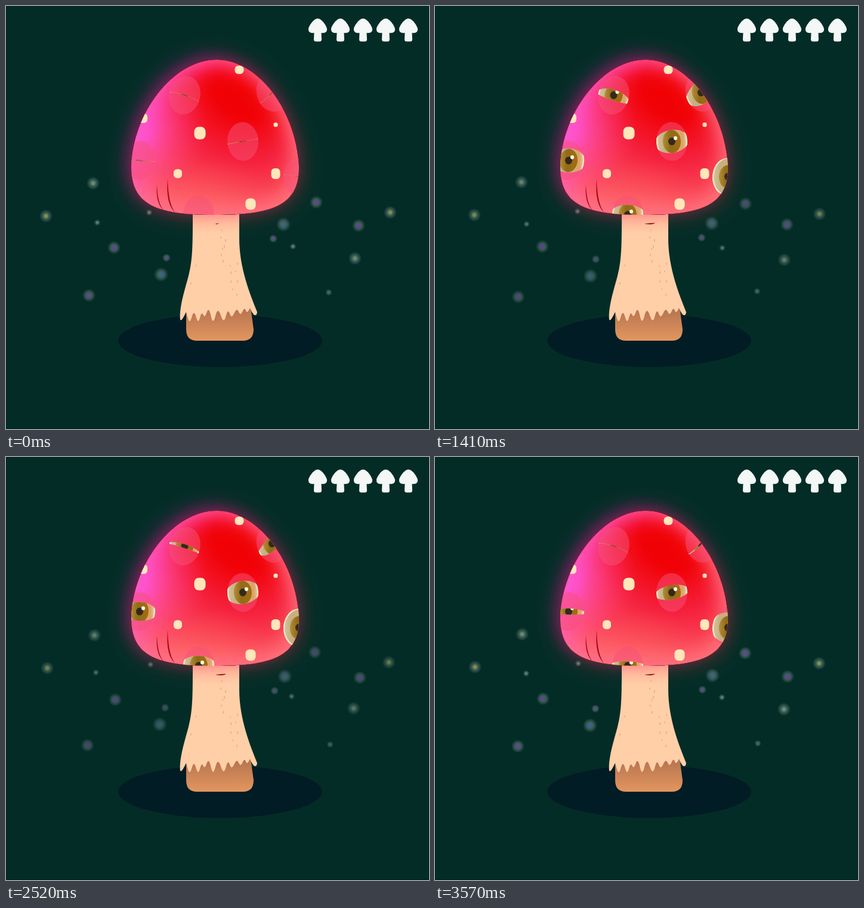
An HTML page with a canvas for the animation above (3600 ms loop, 709 px wide and 709 px high).

```html
<!DOCTYPE html>
<html>
<head>
<meta charset="utf-8">
<style>
html, body { margin: 0; height: 100%; overflow: hidden; background: #042c26; }
canvas { display: block; }
</style>
</head>
<body>
<canvas width="709" height="709"></canvas>
<script>
const canvas = document.querySelector('canvas');
const ctx = canvas.getContext('2d');
const LOOP = 3600, BLINK = 1200, TAU = Math.PI * 2;
const rad = deg => deg * Math.PI / 180;

const cap = new Path2D('M353 90C425 90 488 180 491 270C491 335 446 350 350 350C255 350 210 335 210 270C212 180 280 90 353 90Z');
const aroundCap = new Path2D('M-99 -99H808V808H-99Z');
aroundCap.addPath(cap);
const scratches = new Path2D('M253 299Q250 332 266 344Q254 334 253 299ZM271 289Q267 334 285 347Q272 336 271 289Z');
const base = new Path2D('M302 505L410 505L415 542Q415 561 397 561H320Q302 561 302 542Z');
const icon = new Path2D('M0 21C7 21 15 34 15.5 38C16 43 13 46 6 45L6.5 56Q6.5 59.5 3 59.5H-3Q-6.5 59.5 -6.5 56L-6 45C-13 46 -16 43 -15.5 38C-15 34 -7 21 0 21Z');

// Control points of the drips along the lower hem of the stem, right to left
const hem = [[409,506], [404,517], [400,504], [393,520], [387,505], [378,525], [372,506], [365,534],
  [355,503], [347,536], [340,503], [333,524], [328,511], [322,534], [315,508], [308,534], [302,513]];
const stem = new Path2D('M313 345H391V390C391 440 410 485 421 513Q420 521 415 517Q411 512 409 506');
hem.slice(1, -1).forEach(([x, y], i) => {
  const [nx, ny] = hem[i + 2];
  stem.quadraticCurveTo(x, y, (x + nx) / 2, (y + ny) / 2);
});
stem.lineTo(302, 513);
stem.bezierCurveTo(297, 522, 295, 528, 292, 526);
stem.bezierCurveTo(290, 505, 300, 475, 306, 452);
stem.bezierCurveTo(313, 425, 313, 400, 313, 345);

const specks = [[362,376], [360,388], [368,393], [363,407], [361,417], [364,428], [376,436], [388,432],
  [377,447], [385,445], [377,462], [388,462], [380,475], [387,484], [366,403], [318,435], [310,465]];
const dots = [[391,107,7.5,7], [230,188,7,8], [325,213,9.5,10.5], [288,281,7,7.5],
  [452,199,3.5,3.5], [452,281,7.5,9], [410,332,8.5,9.5]];

// Blink: opening = mid + swing * cos(phase - peak), limited to [0, max]
const eyes = [
  { x: 299.5, y: 149.5, spin: 13, tilt: 18, sag: 5, mid: .5, swing: .5, peak: 600, max: 1 },
  { x: 446, y: 145, spin: -14, tilt: -48, sag: -5, mid: .48, swing: .5, peak: 480, max: 1 },
  { x: 397, y: 227, spin: -3, tilt: -10, sag: 0, mid: .66, swing: .77, peak: 345, max: .6 },
  { x: 224, y: 259, spin: 6, tilt: 2, sag: 2, mid: .45, swing: .45, peak: 405, max: .63 },
  { x: 323, y: 350, spin: 0, tilt: 2, sag: -1, mid: .46, swing: .6, peak: 345, max: .52 },
  { x: 491, y: 286, spin: 4, tilt: 9, sag: 1, mid: .47, swing: .53, peak: 145, max: 1 }
];

const tints = { green: '175,215,160', yellow: '225,222,95', purple: '178,85,235', blue: '90,150,210' };
const times = [0, 600, 1050, 1770, 2520, 3120];
const swarms = [
  { dx: [0, -2.6, -3, .9, 2.2, 1.4], dy: [0, -.9, -1.6, -1.5, 1.8, .7], glow: [.6, .6, .57, .55, .52, .38],
    flies: [[146,297,11,'green'], [67,352,11,'yellow'], [181,405,11,'purple'], [465,366,12,'blue'],
      [448,390,7,'purple'], [591,368,11,'purple'], [240,346,5.5,'green'], [541,480,5.5,'blue']] },
  { dx: [0, 2.3, 1.6, -.6, -2.3, -2], dy: [0, 2.3, 1.7, 2.8, -1.8, -3.1], glow: [.6, .68, .5, .55, .47, 1],
    flies: [[520,329,11,'purple'], [644,346,11,'yellow'], [585,423,11,'green'], [139,485,11,'purple'],
      [260,450,12,'blue'], [269,422,7,'purple'], [153,363,5.5,'green'], [481,403,5.5,'green']] }
];

// Smooth closed curve through the values at `times`
function cycle(values, t) {
  const n = times.length;
  const at = i => times[(i + n) % n] + Math.floor(i / n) * LOOP;
  const value = i => values[(i + n) % n];
  const slope = i => (value(i + 1) - value(i - 1)) / (at(i + 1) - at(i - 1));
  let i = n - 1;
  while (times[i] > t) i--;
  const span = at(i + 1) - at(i), u = (t - at(i)) / span, v = 1 - u;
  return v * v * ((1 + 2 * u) * value(i) + u * span * slope(i)) +
    u * u * ((3 - 2 * u) * value(i + 1) - v * span * slope(i + 1));
}

function addStops(gradient, stops) {
  stops.forEach(([offset, color]) => gradient.addColorStop(offset, color));
  return gradient;
}
const linear = (x0, y0, x1, y1, ...stops) => addStops(ctx.createLinearGradient(x0, y0, x1, y1), stops);
const radial = (x, y, r, ...stops) => addStops(ctx.createRadialGradient(x, y, 0, x, y, r), stops);

function fill(color, path, rule = 'nonzero') {
  ctx.fillStyle = color;
  ctx.fill(path, rule);
}
function oval(x, y, rx, ry, color, angle = 0) {
  const path = new Path2D();
  path.ellipse(x, y, rx, ry, rad(angle), 0, TAU);
  if (color) fill(color, path);
  return path;
}
function setShadow(color, blur, x, y) {
  ctx.shadowColor = color;
  ctx.shadowBlur = blur;
  ctx.shadowOffsetX = x;
  ctx.shadowOffsetY = y;
}

function drawFlies(t) {
  for (const { dx, dy, glow, flies } of swarms) {
    ctx.globalAlpha = Math.min(1, cycle(glow, t));
    for (const [x, y, r, tint] of flies) {
      const px = x + cycle(dx, t), py = y + cycle(dy, t), rgb = tints[tint];
      oval(px, py, r, r, radial(px, py, r, [0, `rgba(${rgb},1)`], [.25, `rgba(${rgb},.88)`],
        [.45, 'rgba(175,190,190,.55)'], [.75, 'rgba(175,190,190,.27)'], [1, 'rgba(175,190,190,0)']));
    }
  }
  ctx.globalAlpha = 1;
}

function drawStem(wake) {
  oval(359, 561, 171, 44, '#011c25');
  fill(linear(0, 510, 0, 560, [0, '#b87550'], [1, '#e2965f']), base);
  fill(linear(0, 350, 0, 385, [0, '#ffc4a2'], [1, '#ffcfa8']), stem);
  specks.forEach(([x, y], i) => oval(x, y, 1, 1.4 + i % 3 * .5, 'rgba(205,145,110,.5)'));
  const end = 357 + 12 * wake;
  fill('#8c1111', new Path2D(`M351 365Q355 364 ${end} 363.5Q${end - 4} 367.5 351 365Z`));
}

function drawEye({ x, y, spin, tilt, sag, mid, swing, peak, max }, t, wake) {
  const open = mid + swing * Math.cos((t - peak) / BLINK * TAU);
  const h = Math.max(.3, 32 * wake * Math.min(max, Math.max(0, open)));
  const top = (-h - sag / 4) / .75, bottom = (h - sag / 4) / .75;
  ctx.save();
  ctx.translate(x, y);
  const spot = oval(0, 0, 26, 32.5, 'rgba(248,80,120,.5)', spin);
  ctx.clip(spot);
  ctx.rotate(rad(tilt));
  ctx.clip(new Path2D(`M-28 ${sag}C-28 ${top} 28 ${top} 28 ${sag}C28 ${bottom} -28 ${bottom} -28 ${sag}Z`));
  ctx.rotate(rad(-tilt));
  fill(linear(-26, 0, 26, 0, [0, '#d5c79e'], [.25, '#c5b083'], [.65, '#cfae78'], [.85, '#dda267'], [1, '#ecd2a0']), spot);
  ctx.strokeStyle = '#fbe9c4';
  ctx.lineWidth = 4.5;
  ctx.stroke(spot);
  oval(0, 0, 15, 19.5, linear(-15, 0, 15, 0, [0, '#b48d36'], [.4, '#8f6c18'], [1, '#a66c10']), spin);
  oval(0, 0, 6, 6.5, '#35281b');
  oval(6, -5.5, 3, 3.2, '#fffbe8');
  ctx.restore();
}

function drawCap(t, wake) {
  ctx.save();
  setShadow('rgba(255,0,200,.36)', 28, -8, -7);
  fill('#f01020', cap);
  setShadow('rgba(255,50,45,.36)', 32, 2, 2);
  fill('#f01020', cap);
  ctx.restore();

  fill(radial(405, 130, 255, [0, '#f00000'], [.23, '#f10208'], [.5, '#f5203c'], [.78, '#fb4a5c'], [1, '#ff6a70']), cap);
  fill(radial(350, 375, 120, [0, 'rgba(255,120,105,.7)'], [1, 'rgba(255,100,100,0)']), cap);
  fill(radial(203, 205, 135, [0, 'rgba(255,90,255,.9)'], [.25, 'rgba(255,85,230,.75)'],
    [.6, 'rgba(255,70,170,.42)'], [1, 'rgba(255,50,110,0)']), cap);

  ctx.save();
  ctx.clip(cap);
  // Light along the inner edges: magenta from the upper left, salmon from the lower right
  setShadow('rgba(255,70,235,.75)', 34, 8, 5);
  fill('#000', aroundCap, 'evenodd');
  setShadow('rgba(255,125,112,.85)', 34, -9, -7);
  fill('#000', aroundCap, 'evenodd');
  setShadow('transparent', 0, 0, 0);
  for (const [x, y, rx, ry] of dots) {
    const dot = new Path2D();
    dot.roundRect(x - rx, y - ry, rx * 2, ry * 2, rx * .8);
    fill('#ffe7ba', dot);
  }
  eyes.forEach(eye => drawEye(eye, t, wake));
  fill('#a5061c', scratches);
  ctx.restore();
}

function drawIcons() {
  for (let i = 0; i < 5; i++) {
    ctx.save();
    ctx.translate(522.5 + 38 * i, 0);
    fill('#f3f7f5', icon);
    ctx.restore();
  }
}

function draw(now) {
  const t = now % LOOP;
  const u = Math.min(1, t / 300), wake = u * u * (3 - 2 * u);
  ctx.fillStyle = '#042c26';
  ctx.fillRect(0, 0, 709, 709);
  ctx.strokeStyle = '#02201b';
  ctx.lineWidth = 1;
  ctx.strokeRect(.5, .5, 708, 708);
  drawStem(wake);
  drawFlies(t);
  drawCap(t, wake);
  drawIcons();
}

const start = performance.now();
function tick() {
  draw(performance.now() - start);
  requestAnimationFrame(tick);
}
tick();
</script>
</body>
</html>
```
